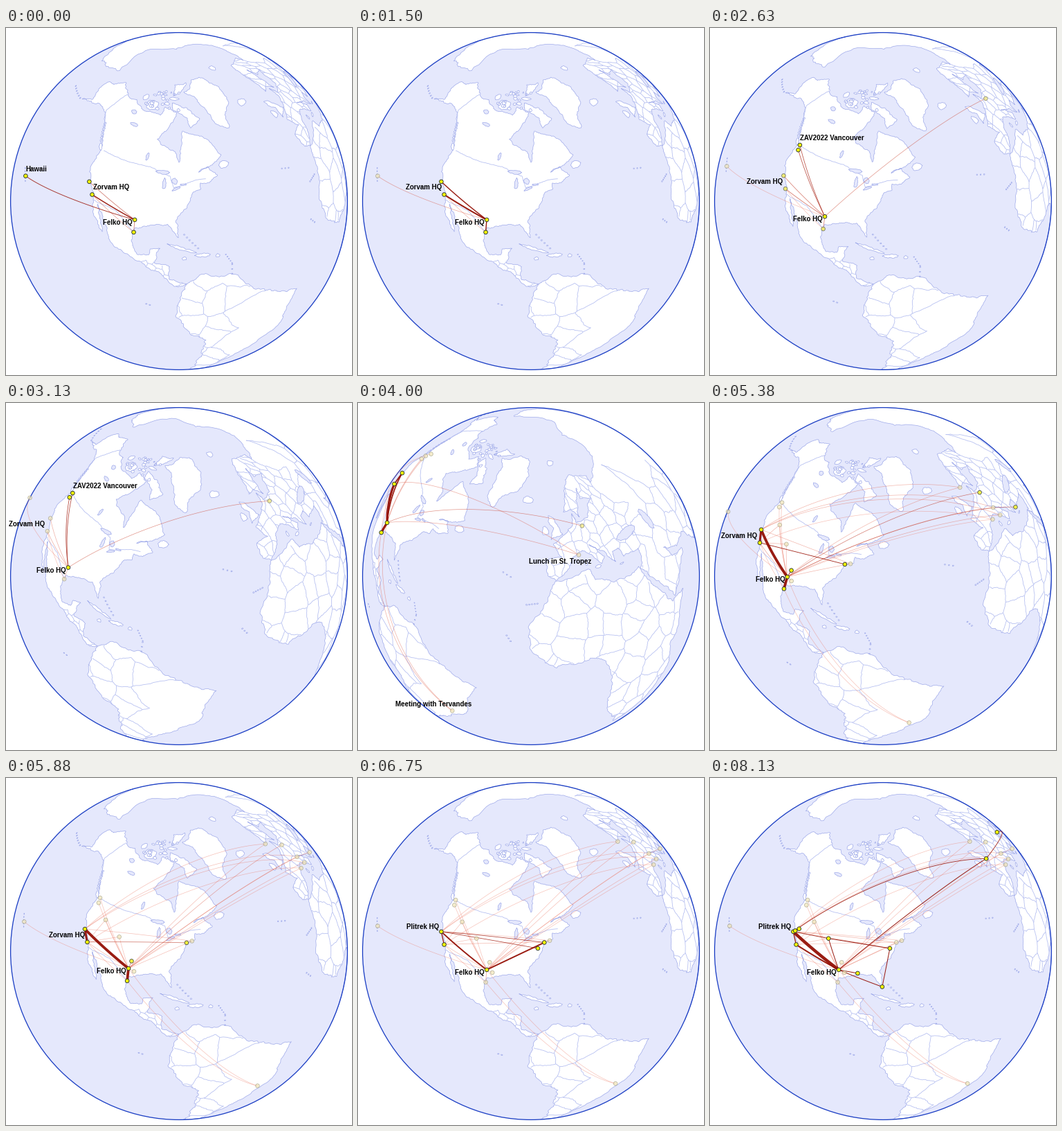
These frames come from a looping animation (500x501 px, 9.37 s). A matplotlib script:

```python
import numpy as np
import matplotlib.pyplot as plt
from matplotlib.animation import FuncAnimation
from matplotlib.collections import LineCollection, PolyCollection
from matplotlib.path import Path
from matplotlib.tri import Triangulation

W, H, DPI = 500, 501, 100
PX = 72 / DPI
CX, CY, R, TILT = 250, 250, 243.4, np.radians(38)
FRAMES, LOOP, STEP = 75, 9370, 0.125
SEA, COAST, BORDER = "#e5e8fc", "#9faaea", "#b5bff1"

rng = np.random.default_rng(7)
lands, lakes, borders = [], [], []


def roughen(points, levels=4, first=0.07, growth=0.05):
    """Midpoint displacement; finer levels are relatively rougher."""
    pts = np.array(points, float).reshape(-1, 2)
    for level in range(levels):
        a, b = pts[:-1], pts[1:]
        d, mid = b - a, (a + b) / 2
        c = np.maximum(np.cos(np.radians(mid[:, 1])), 0.15)
        amount = first + growth * level
        shift = rng.uniform(-amount, amount, len(a))[:, None]
        mid = mid + np.column_stack([-d[:, 1] / c, d[:, 0] * c]) * shift
        out = np.empty((len(pts) + len(a), 2))
        out[0::2], out[1::2] = pts, mid
        pts = out
    return pts


def land(*flat):
    """Coastline through a few lon, lat key points."""
    lands.append(roughen(flat + flat[:2]))
    return lands[-1]


def blob(layer, lon, lat, w, h, tilt=0):
    """Irregular ellipse, used for islands and lakes."""
    a = np.linspace(0, 2 * np.pi, 9)
    r = rng.uniform(0.8, 1.2, 9)
    r[-1] = r[0]
    x, y, k = w * r * np.cos(a), h * r * np.sin(a), np.radians(tilt)
    pts = np.column_stack([lon + x * np.cos(k) - y * np.sin(k), lat + x * np.sin(k) + y * np.cos(k)])
    layer.append(roughen(pts, 2, 0.12))


def chain(lon0, lat0, lon1, lat1, count, size=0.28):
    for s in np.linspace(0, 1, count):
        blob(lands, lon0 + s * (lon1 - lon0), lat0 + s * (lat1 - lat0), size, size * 0.7)


def border(*flat):
    borders.append(roughen(flat, 4, 0.02, 0.03))


def divide(outline, west, east, south, north, step):
    """Split part of a landmass into countries: Voronoi cells of a jittered grid."""
    lon, lat = np.meshgrid(np.arange(west, east, step), np.arange(south, north, step))
    lon = lon.ravel() + rng.uniform(-0.45, 0.45, lon.size) * step
    lat = lat.ravel() + rng.uniform(-0.45, 0.45, lat.size) * step
    tri = Triangulation(lon, lat)
    p = np.column_stack([lon, lat])
    a = p[tri.triangles[:, 0]]
    b, c = p[tri.triangles[:, 1]] - a, p[tri.triangles[:, 2]] - a
    det = 2 * (b[:, 0] * c[:, 1] - b[:, 1] * c[:, 0])
    b2, c2 = (b ** 2).sum(1), (c ** 2).sum(1)
    centre = a + np.column_stack([c[:, 1] * b2 - b[:, 1] * c2, b[:, 0] * c2 - c[:, 0] * b2]) / det[:, None]
    shape = Path(outline)
    for i, around in enumerate(tri.neighbors):
        for j in around[around > i]:
            if np.abs(centre[i] - centre[j]).max() > 3 * step:
                continue
            line = roughen([centre[i], centre[j]], 4, 0.06, 0.03)
            inside = shape.contains_points(line)
            if inside.any():
                line[~inside] = np.nan
                borders.append(line)


# Landmasses
america = land(
    -168, 65.6, -162, 67, -157, 71.3, -135, 69.2, -128, 70.3, -115, 68, -97, 68, -95, 71.5, -82, 69.5,
    -87, 65, -94.5, 59, -82.3, 55, -80, 51.3, -79, 54.5, -77.5, 62.5, -70, 61, -64.5, 60, -56, 52,
    -60, 50.2, -70, 47.5, -65, 49, -61, 45.5, -65.5, 43.5, -70, 43.7, -70, 41.7, -74, 40.6, -76, 37,
    -81.3, 31.3, -80.2, 25.5, -82.8, 28.5, -84.5, 30, -90, 29.3, -97.2, 27.5, -97.7, 22.5, -95, 18.3,
    -91, 18.8, -90.4, 21, -87, 21.5, -88.7, 16, -83.3, 15, -83.5, 10.5, -77.4, 8.5, -80.4, 7.4,
    -87.7, 13, -95, 16, -105.5, 20.5, -109, 26, -114.7, 31.7, -109.7, 23.2, -115, 28, -117.2, 32.7,
    -124.3, 40.4, -124.7, 48.3, -130.5, 55, -140, 59.8, -150, 60, -164, 54.7, -158, 58.5, -165, 61.5)
south_america = land(
    -77.4, 8.5, -72, 12, -62, 10.7, -50, 1, -44, -2.7, -35.3, -6, -39, -14, -41, -22, -48.5, -27,
    -58, -35, -65, -43, -68, -54, -75, -48, -71, -30, -70.3, -18.3, -76.2, -14, -81.2, -5, -80, 1)
eurasia = land(
    -5.6, 36, -9, 38, -8.8, 43.3, -1.5, 43.5, -4.7, 48.4, 1.6, 50.9, 8.5, 53.7, 10.5, 57.6, 10.8, 54.2,
    19, 54.4, 23.5, 58.5, 29, 60, 21.3, 61.5, 24, 65.5, 17.5, 61.5, 14.2, 55.6, 11, 59, 5.5, 59,
    11, 64.5, 20, 70, 28, 71, 41, 67, 38, 64.5, 68, 68.5, 104, 77.7, 180, 69, 160, 58, 135, 54,
    122, 39, 122, 30, 108, 20, 100, 8, 91, 22.5, 80, 12, 73, 18, 67, 25, 57, 25.5, 49, 30, 51.5, 25,
    59.8, 22.5, 45, 12.7, 35, 28, 32.5, 30, 34.5, 31.5, 36, 36.5, 27.3, 37, 26.5, 40.5, 23, 40.3,
    22.5, 36.7, 19.4, 41.5, 13, 45.5, 18.4, 40, 16, 38, 8.8, 44.4, 3.2, 42.8, -0.5, 38.5)
africa = land(
    -5.9, 35.8, 10, 37.3, 11, 33.5, 19, 30.5, 32, 31.2, 32.5, 30, 37.3, 20, 43, 11.7, 51, 11.8, 40, -3,
    40.5, -15, 32.5, -28, 20, -34.8, 12, -17, 13, -8, 9.5, 4, 4.5, 6.3, -7.5, 4.5, -16.7, 12.5,
    -17, 21, -9.7, 30)
land(-72, 78.2, -45, 82.8, -22, 82, -20, 74, -25, 70, -40, 65, -43.5, 60, -50, 62.5, -53, 69, -58, 75)
land(-88, 73.5, -72, 71.5, -62, 66.5, -71, 63.5, -73, 67.5, -86, 70.5)
land(-88, 76.5, -76, 78.5, -62, 82.3, -90, 81.5)
land(-5.5, 50.1, 1.3, 51.2, -0.5, 54.5, -2, 57.5, -5, 58.6, -5, 55.5, -3, 54, -4.5, 52.5)

# Islands
for island in ((-109, 71, 7, 1.8), (-121.5, 73, 3, 1.3), (-86, 75.3, 6, 0.6), (-56, 48.7, 2.6, 1.4),
               (-126, 49.7, 2, 0.6, -35), (-79.5, 21.7, 5.3, 0.5, -17), (-71.3, 19, 2.8, 0.7),
               (-18.7, 64.9, 4.6, 1.2), (-8, 53.4, 1.9, 1.6), (14, 37.5, 1.4, 0.6), (9, 40, 0.6, 1.1),
               (25, 35.2, 1.2, 0.2), (18, 78.5, 6, 1.1)):
    blob(lands, *island)
for _ in range(26):
    blob(lands, rng.uniform(-118, -80), rng.uniform(70, 78), rng.uniform(0.8, 3), rng.uniform(0.3, 0.7))
chain(-160, 22, -155.6, 19.6, 5)
chain(-78, 26.5, -73, 21.5, 6)
chain(-78, 18.1, -66, 18.2, 2, 0.8)
chain(-63, 18, -61, 14.5, 5, 0.2)
chain(-61, 14, -61.3, 10.5, 3, 0.25)
chain(-18, 28.2, -13.8, 28.6, 5)
chain(-28.5, 38.7, -25, 37.4, 3)
chain(-25, 17, -23.5, 15, 3)
chain(-91.2, -0.4, -90, -0.7, 2)
chain(-133.5, 57, -128, 51.5, 7, 0.6)
chain(-166, 54, -180, 51.5, 6, 0.4)

# Inland water
for water in ((-88, 47.7, 3.5, 0.7), (-87, 43.8, 0.8, 2), (-82, 44.7, 1.3, 1), (-81.2, 42.2, 2, 0.35, 20),
              (-78, 43.6, 1.4, 0.3), (-97.8, 52.3, 0.8, 1.6), (-114, 61.8, 3.2, 0.6), (-121, 66, 2.5, 0.7),
              (34.5, 43.4, 6.5, 1.7), (50.5, 42, 2, 4.6)):
    blob(lakes, *water)

# Frontiers
border(-123, 49, -116, 49, -109, 49, -102, 49, -95, 49)
border(-95, 49, -84.5, 46.5, -82.4, 42.5, -76.5, 44, -71.5, 45, -67, 45)
border(-141, 69.6, -141, 60.3, -130.5, 55.5)
border(-117.1, 32.5, -106.5, 31.8, -102.5, 29.7, -97.2, 25.9)
divide(america, -94, -80, 6, 20, 3.5)
divide(south_america, -86, -50, -55, 14, 9)
divide(africa, -20, 56, -40, 42, 8.5)
divide(eurasia, -14, 44, 34, 72, 5.5)
divide(eurasia, 38, 100, 10, 55, 9)

# Places and flights
PLACES = dict(
    AUS=(-97.7, 30.2), LA=(-118.4, 33.9), SF=(-122.1, 37.4), BRO=(-97.4, 25.9), HI=(-156.9, 20.8),
    VAN=(-123.2, 49.2), SEA=(-122.3, 47.5), BER=(13.5, 52.4), STT=(6.6, 43.2), SAO=(-46.9, -23.3),
    DAL=(-97, 32.9), HOU=(-95.3, 29.6), SUN=(-114.3, 43.5), DEN=(-104.9, 39.8), NYC=(-74, 40.8),
    DC=(-77, 38.9), NAN=(-71.5, 41.3), STV=(5.6, 58.9), MYK=(25.3, 37.4), ROM=(12.5, 41.9),
    VEN=(12.3, 45.5), LON=(-0.2, 51.5), DOH=(51.5, 25.3), MIA=(-80.3, 25.8), NOL=(-90, 30),
    TAH=(-120, 39.2), OAK=(-121.4, 38))
END = LOOP / 1000
routes = {}


def trips(hubs, stops, start, end, width):
    """Flights from every hub to every stop while start <= t < end."""
    for hub in hubs.split():
        for stop in stops.split():
            key = tuple(sorted((hub, stop)))
            routes.setdefault(key, []).append((start, end, width))


trips("AUS", "HI", -1, 0.8, 0.9)
trips("AUS", "LA", -1, 0.9, 1.4)
trips("AUS", "SF BRO", -1, 0.9, 0.6)
trips("LA", "BRO", -1, 0.9, 0.3)
trips("AUS", "LA", 0.9, 2.2, 2)
trips("AUS", "SF BRO", 0.9, 2.2, 1.4)
trips("AUS", "VAN SEA", 2.5, 3.3, 0.8)
trips("AUS", "BER", 2.2, 4.1, 0.35)
trips("AUS BRO", "SAO", 3.2, 3.4, 0.5)
trips("AUS LA", "STT", 3.4, 3.5, 0.5)
trips("AUS", "LA BRO", 3.4, 4.5, 3.2)
trips("SF", "AUS LA", 3.5, 4.5, 1.7)
trips("LA AUS", "SUN DEN", 4.1, 4.4, 0.7)
trips("AUS", "HOU", 4.1, 4.4, 0.7)
trips("AUS SF", "ROM VEN STV NAN", 4.4, 4.6, 0.5)
trips("AUS", "BER MYK", 4.5, 5.4, 0.5)
trips("AUS", "SF BRO", 4.5, 5.9, 3.8)
trips("LA", "SF", 4.5, 5.9, 3)
trips("LA", "NYC", 4.9, 5.6, 0.9)
trips("AUS", "DAL", 4.9, 5.6, 0.9)
trips("AUS", "SF NYC", 5.9, 7.2, 1.9)
trips("LA", "SF", 5.9, END, 1.3)
trips("SF", "NYC DC", 6.1, 7.2, 0.8)
trips("AUS", "SF", 7.2, END, 4.4)
trips("AUS", "LA", 7.2, END, 2)
trips("AUS", "DEN MIA NOL LON", 7.4, END, 1)
trips("DC", "DEN MIA", 7.5, END, 1)
trips("SF", "DEN TAH OAK LON", 7.5, END, 0.9)
trips("LON", "DOH", 7.6, END, 0.9)

# text, place, offset, alignment, start, end
LABELS = [
    ("Hawaii", "HI", 0, -7, "left", 0, 0.74),
    ("Zorvam HQ", "LA", 1, -7, "left", 0, 0.74),
    ("Zorvam HQ", "LA", -3.5, -7, "right", 0.74, 3.55),
    ("Zorvam HQ", "LA", -3.5, -7, "right", 4.7, 6.2),
    ("Felko HQ", "AUS", -3.5, 7, "right", 0, 3.55),
    ("Felko HQ", "AUS", -3.5, 7, "right", 4.7, END),
    ("ZAV2022 Vancouver", "VAN", 0.5, -7, "left", 2.55, 3.4),
    ("Meeting with Tervandes", "SAO", -27, -6, "center", 3.4, 4.3),
    ("Lunch in St. Tropez", "STT", -27, 13, "center", 3.7, 4.45),
    ("Plitrek HQ", "SF", -3, -4, "right", 6.2, END)]


def great_circle(a, b):
    (p, q) = (np.array([np.cos(y) * np.cos(x), np.cos(y) * np.sin(x), np.sin(y)])
              for x, y in np.radians([PLACES[a], PLACES[b]]))
    ang, s = np.arccos(p @ q), np.linspace(0, 1, 40)[:, None]
    x, y, z = ((np.sin((1 - s) * ang) * p + np.sin(s * ang) * q) / np.sin(ang)).T
    return np.degrees(np.column_stack([np.arctan2(y, x), np.arcsin(z)]))


arcs = {key: great_circle(*key) for key in routes}


def ease(u):
    u = np.clip(u, 0, 1)
    return 2 * u * u if u < 0.5 else 1 - 2 * (1 - u) ** 2


def centre_lon(t):
    return -80 + 63.7 * (ease((t - 2.25) / 1.75) - ease((t - 4.375) / 1.75))


def project(lonlat, lon0):
    """Orthographic unit-disc position and depth towards the viewer."""
    lon, lat = np.radians(lonlat[:, 0] - lon0), np.radians(lonlat[:, 1])
    flat = np.cos(lat) * np.cos(lon)
    y = np.cos(TILT) * np.sin(lat) - np.sin(TILT) * flat
    depth = np.sin(TILT) * np.sin(lat) + np.cos(TILT) * flat
    return np.column_stack([np.cos(lat) * np.sin(lon), y]), depth


def to_screen(xy):
    return np.array([CX, CY]) + xy * [R, -R]


def shapes(polygons, lon0):
    """Visible polygons, with hidden vertices pushed out to the limb."""
    out = []
    for poly in polygons:
        xy, depth = project(poly, lon0)
        if depth.max() > 0:
            back = depth < 0
            xy[back] /= np.linalg.norm(xy[back], axis=1)[:, None]
            out.append(to_screen(xy))
    return out


def open_lines(lines, lon0):
    out = []
    for line in lines:
        xy, depth = project(line, lon0)
        xy[depth < 0] = np.nan
        if np.nanmax(depth) > 0:
            out.append(to_screen(xy))
    return out


def heat_and_width(spells, t):
    """Strength of a route now; it cools exponentially after each spell."""
    heat, width = 0, 0.7
    for start, end, w in spells:
        if t >= start:
            k = np.clip((t - start) / 0.2 + 0.3, 0, 1) * np.exp(-max(t - end, 0) / 0.5)
            heat = max(heat, k * min(w, 1))
            width = max(width, 0.7 + k * k * (w - 0.7))
    return heat, width


def blend(cold, hot, k):
    return np.array(cold) + (np.array(hot) - np.array(cold)) * k


fig = plt.figure(figsize=(W / DPI, H / DPI), dpi=DPI, facecolor="white")
ax = fig.add_axes([0, 0, 1, 1])
ax.set(xlim=(0, W), ylim=(H, 0))
ax.axis("off")
ax.add_patch(plt.Circle((CX, CY), R, fc=SEA, ec="none", zorder=0))
land_art = PolyCollection([], facecolors="white", edgecolors=COAST, linewidths=0.7 * PX, zorder=1)
lake_art = PolyCollection([], facecolors=SEA, edgecolors=COAST, linewidths=0.7 * PX, zorder=3)
border_art = LineCollection([], colors=BORDER, linewidths=0.8 * PX, zorder=2)
arc_art = LineCollection([], zorder=5, capstyle="round")
for art in (land_art, lake_art, border_art, arc_art):
    ax.add_collection(art, autolim=False)
ax.add_patch(plt.Circle((CX, CY), R, fc="none", ec="#1c3fc4", lw=1.3 * PX, zorder=4))
dots = ax.scatter([], [], s=(5.6 * PX) ** 2, linewidths=0.9 * PX, zorder=6)
texts = [ax.text(0, 0, label[0], ha=label[4], va="baseline", family="Liberation Sans",
                 weight="bold", size=9.8 * PX, color="black", zorder=7) for label in LABELS]


def draw(i):
    t = i * STEP
    lon0 = centre_lon(t)
    land_art.set_verts(shapes(lands, lon0))
    lake_art.set_verts(shapes(lakes, lon0))
    border_art.set_segments(open_lines(borders, lon0))
    spots = {k: to_screen(project(np.array([p]), lon0)[0])[0] for k, p in PLACES.items()}

    flown, warmth = [], {}
    for key, spells in routes.items():
        if t >= spells[0][0]:
            heat, width = heat_and_width(spells, t)
            flown.append((heat, width, key))
            for end in key:
                warmth[end] = max(warmth.get(end, 0), np.clip((heat - 0.25) / 0.35, 0, 1))
    flown.sort()
    arc_art.set_segments([to_screen(project(arcs[key], lon0)[0]) for _, _, key in flown])
    arc_art.set_color([blend((0.93, 0.43, 0.34, 0.4), (0.58, 0.06, 0.02, 0.95), h) for h, _, _ in flown])
    arc_art.set_linewidth([w * PX for _, w, _ in flown])

    names = sorted(warmth, key=warmth.get)
    dots.set_offsets([spots[n] for n in names])
    dots.set_facecolor([blend((0.95, 0.91, 0.72, 0.65), (0.98, 0.98, 0.03, 1), warmth[n]) for n in names])
    dots.set_edgecolor([blend((0.6, 0.58, 0.48, 0.6), (0.15, 0.2, 0.2, 1), warmth[n]) for n in names])

    for text, (_, place, dx, dy, _, start, end) in zip(texts, LABELS):
        text.set_visible(start <= t < end)
        text.set_position(spots[place] + [dx, dy])
    return []


anim = FuncAnimation(fig, draw, frames=FRAMES, interval=LOOP / FRAMES, repeat=True,
                     repeat_delay=0, blit=False)
plt.show()
```
